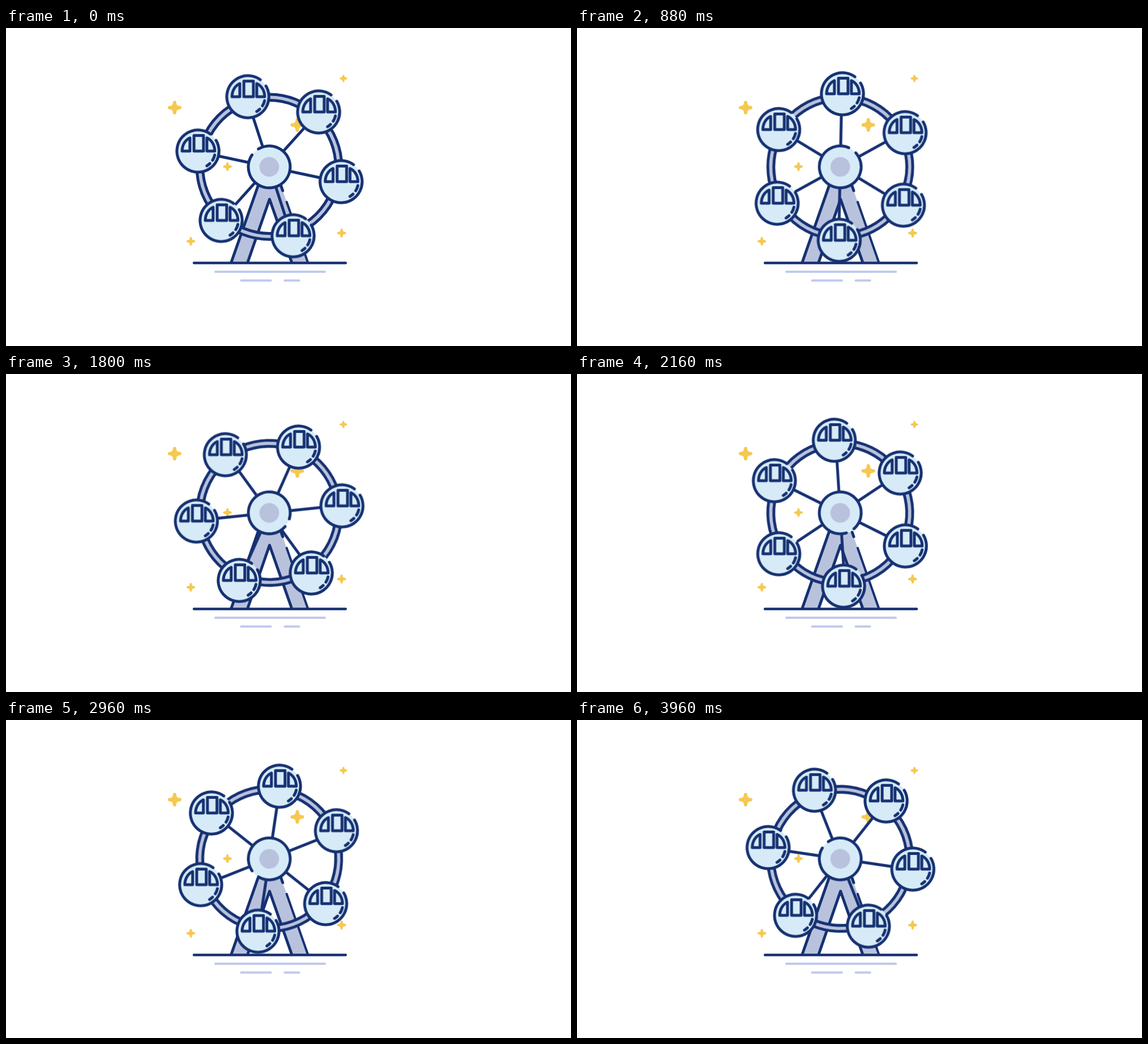
Recreate the animation shown at these times as an HTML page. Size 998x561 px, loop 4000 ms.

```html
<!DOCTYPE html>
<html lang="en">
<head>
<meta charset="utf-8">
<title>Ferris wheel</title>
<style>
  html, body { margin: 0; width: 100%; height: 100%; overflow: hidden; background: #fff; }
  svg { display: block; width: 100vw; height: 100vh; }
  .line { fill: none; stroke: #163172; stroke-width: 5; stroke-linecap: round; stroke-linejoin: round; }
  .pale { fill: none; stroke: #bfcaec; stroke-width: 4.2; stroke-linecap: round; }
  .glass { fill: #d6ebf7; }
  .steel { fill: #b9c2dd; }
  .star { fill: #f5c951; stroke: #f5c951; stroke-width: 6; stroke-linejoin: round; }
  /* the small head start keeps each step clear of its boundary */
  .turn, .upright { animation: turn 4s steps(100) -4ms infinite; }
  .upright { animation-direction: reverse; animation-name: level; animation-direction: normal; }
  @keyframes turn { to { transform: rotate(360deg); } }
  @keyframes level { to { transform: rotate(-360deg); } }
</style>
</head>
<body>
<svg viewBox="0 0 998 561">
  <defs>
    <path id="star" class="star" d="M0-9Q0 0 9 0Q0 0 0 9Q0 0-9 0Q0 0 0-9Z"/>
    <g id="cabin">
      <circle class="glass" r="37.2"/>
      <g class="line">
        <path id="shell"/>
        <path id="shine"/>
        <path d="M-7-27.5H9.8V0H-7ZM-28 0H-14.2V-23.3C-22-20-28-11-28 0ZM29.7 0H15.8V-23.3C23.7-20 29.7-11 29.7 0Z"/>
      </g>
    </g>
  </defs>

  <g id="stars"></g>

  <path class="steel" d="M445 279H486L533.3 414H505L465.5 302L426.5 414H397.7Z"/>
  <g class="line">
    <path d="M445 279L398 413M427 413L465.5 302L504.5 413M486 279L488.8 287"/>
    <path d="M495.8 307L533 413" stroke-width="4" style="stroke-width:4"/>
    <path d="M332 414.5H600" style="stroke-width:4.4"/>
  </g>
  <path class="pale" d="M370 430H563M415.5 445.5H467.5M492.5 445.5H517.5"/>

  <g transform="translate(465 245)">
    <g class="turn">
      <circle r="122.7" fill="none" stroke="#b9c2dd" stroke-width="10"/>
      <g class="line">
        <circle r="128"/>
        <circle r="117.4"/>
        <path id="spokes"/>
      </g>
      <g id="cabins"></g>
      <circle class="glass" r="37"/>
      <circle class="steel" r="17.4"/>
      <path class="line" id="hub"/>
    </g>
  </g>
</svg>
<script>
  const byId = id => document.getElementById(id);
  const polar = (r, deg) => {
    const a = deg * Math.PI / 180;
    return `${(r * Math.cos(a)).toFixed(2)} ${(r * Math.sin(a)).toFixed(2)}`;
  };
  const arc = (r, from, to) =>
    `M${polar(r, from)}A${r} ${r} 0 ${to - from > 180 ? 1 : 0} 1 ${polar(r, to)}`;

  byId('shell').setAttribute('d', arc(37.2, -30.7, 306.3));
  byId('shine').setAttribute('d', arc(30.4, 13, 32) + arc(30.4, 46, 59));
  byId('hub').setAttribute('d', arc(37, -121.3, 215));

  byId('spokes').setAttribute('d', [0, 1, 2, 3, 4, 5]
    .map(i => `M0 0L${polar(90, 12 + 60 * i)}`).join(''));

  // angle and distance of each cabin from the axle
  const cabins = [[11.6, 129.5], [70.9, 128.6], [132, 127.1], [192.5, 129], [253, 129.4], [312, 130.4]];
  byId('cabins').innerHTML = cabins.map(([deg, r]) =>
    `<g transform="translate(${polar(r, deg)})"><use class="upright" href="#cabin"/></g>`).join('');

  // x, y, reach
  const stars = [[297.8, 140.4, 12], [514.5, 171, 12], [391.2, 244.5, 7.7],
                 [326.5, 376.2, 7.7], [592.8, 361.7, 8], [596, 89, 6.6]];
  byId('stars').innerHTML = stars.map(([x, y, reach]) =>
    `<use href="#star" transform="translate(${x} ${y}) scale(${reach / 12})"/>`).join('');
</script>
</body>
</html>
```
